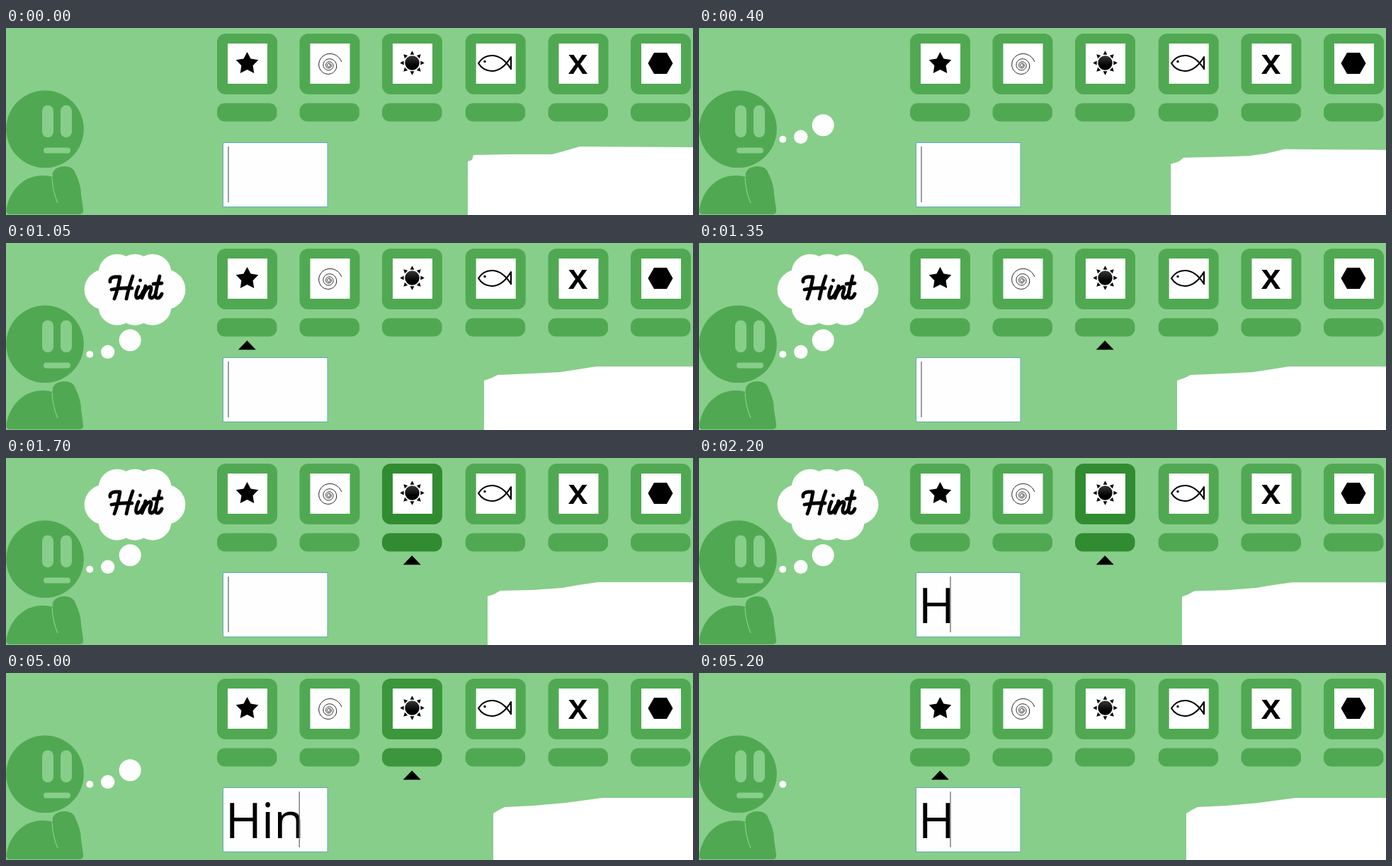
These frames come from a looping animation (970x265 px, 5300 ms). An HTML page:

```html
<!DOCTYPE html>
<html lang="en">
<head>
<meta charset="utf-8">
<title>Hint</title>
<style>
  html, body { margin: 0; width: 100%; height: 100%; overflow: hidden; background: #87ce8a; }
  svg { display: block; }
  .typed { font: 70px "Open Sans", "Noto Sans", sans-serif; letter-spacing: -0.5px; }
  .line { fill: none; stroke: #000; stroke-linecap: round; stroke-linejoin: round; }
</style>
</head>
<body>
<svg width="970" height="265" viewBox="0 0 970 265">
  <defs>
    <linearGradient id="sunFill" x1="0" y1="0" x2="0" y2="1">
      <stop offset="0" stop-color="#383838"/><stop offset=".7" stop-color="#000"/>
    </linearGradient>
  </defs>

  <g id="person" fill="#50a952">
    <circle cx="55" cy="143.3" r="54.8"/>
    <path d="M4 264Q-1 263 1 254C8 225 28 209 52 209Q60 209 66 211C64 202 72 196 83 196Q95 196 98 206Q106 222 106 236L109 257Q110 264 104 264Z"/>
    <path d="M65 212Q66 232 73 248" fill="none" stroke="#87ce8a" stroke-width="1.2"/>
    <g fill="#87ce8a">
      <rect x="51" y="109.500" width="16" height="45.500" rx="8"/>
      <rect x="77" y="109.500" width="16" height="45.500" rx="8"/>
      <rect x="53" y="169.500" width="38" height="8" rx="4"/>
    </g>
  </g>

  <g id="thought" fill="#fefefe">
    <circle cx="118.300" cy="157.800" r="5"/>
    <circle cx="143.700" cy="154.300" r="9.700"/>
    <circle cx="175.200" cy="137.800" r="15.500"/>
    <g>
      <g id="cloud"><rect x="139" y="42" width="86" height="48"/></g>
      <g class="line" stroke-width="4.800" role="img" aria-label="Hint">
        <path d="M147 55Q146 49 154 48H161Q158 66 153 79M179 47Q173 64 170 79M149 66Q165 63 178 64"/>
        <path d="M187 62Q181 76 185 78Q190 78 194 68M189.500 53h.1"/>
        <path d="M197 61L192 78Q197 64 203 62Q207 62 203 72Q202 79 206 78Q210 76 212 70"/>
        <path d="M217 47Q212 66 211 73Q211 79 215 78Q218 77 220 72M208 58L220 57"/>
      </g>
    </g>
  </g>

  <g id="cards"></g>

  <g id="icons">
    <path id="star"/>
    <path id="spiral" class="line" stroke-width=".9"/>
    <path id="rays"/>
    <circle cx="573.500" cy="49.500" r="10.200" fill="url(#sunFill)"/>
    <path class="line" stroke-width="2.200" d="M713 41Q701 61 686 61Q674 61 667 50Q674 39 686 39Q701 39 713 58Z"/>
    <circle cx="676" cy="47.500" r="1.700"/>
    <path d="M794.500 38h7l6 9 6-9h7l-9.500 13 10 14h-7l-6.500-10-6.500 10h-7l10-14z"/>
    <path d="M906.500 50L915 35H933L941.500 50L933 65H915Z"/>
  </g>

  <path id="arrow" d="M-12.500 151.300L0 138.300L12.500 151.300Z"/>

  <rect x="306.500" y="162.500" width="147.500" height="91" fill="#fefefe" stroke="#62a9b8"/>
  <text id="typed" class="typed" x="309.600" y="234"></text>
  <rect id="caret" y="168" width="1.400" height="79" fill="#777"/>

  <polygon id="sheet" fill="#fff"/>
</svg>
<script>
const LOOP = 5300;
const $ = id => document.getElementById(id);
const add = (parent, tag, attrs) => {
  const el = document.createElementNS("http://www.w3.org/2000/svg", tag);
  for (const k in attrs) el.setAttribute(k, attrs[k]);
  return parent.appendChild(el);
};
const polar = (cx, cy, r, a) => `${(cx + r * Math.cos(a)).toFixed(2)} ${(cy + r * Math.sin(a)).toFixed(2)}`;
const range = (n, f) => Array.from({ length: n }, (_, i) => f(i));
const mix = (a, b, k) => a.map((v, i) => v + (b[i] - v) * k);

// Cloud lobes
for (const x of [139, 225]) add($("cloud"), "circle", { cx: x, cy: 66, r: 28.4 });
for (const x of [157, 182, 207])
  for (const y of [42.3, 90]) add($("cloud"), "circle", { cx: x, cy: y, r: 26.5 });

// Cards with label pills
const cardX = [298, 414.5, 531, 648.7, 765.5, 882];
const cards = cardX.map(x => {
  const g = add($("cards"), "g", { fill: "#50a952" });
  add(g, "rect", { x, y: 8, width: 85, height: 86, rx: 12 });
  add(g, "rect", { x, y: 106.5, width: 84.5, height: 26, rx: 11 });
  add(g, "rect", { x: x + 15, y: 22, width: 56, height: 57, fill: "#fff" });
  return g;
});

// Icons built from angles
$("star").setAttribute("d", "M" + range(10, i =>
  polar(340.5, 50.5, i % 2 ? 8.5 : 16.6, i * Math.PI / 5 - Math.PI / 2)).join("L") + "Z");
$("spiral").setAttribute("d", "M" + range(260, i => {
  const a = 0.3 + i * 0.1;
  return polar(456, 53, 19 * Math.exp(-0.092 * a), -a);
}).join("L"));
$("rays").setAttribute("d", range(8, i => {
  const a = i * Math.PI / 4, p = (r, d) => polar(573.5, 49.5, r, a + d);
  return `M${p(17.3, 0)}L${p(12.2, 0.24)}L${p(12.2, -0.24)}Z`;
}).join(""));

// Top edge of the white sheet: [step, x, y, x, y, ...]
const edges = [
  [0, 652, 189, 658, 187, 660, 180, 712, 179, 771, 179, 786, 175, 810, 168, 970, 169],
  [4, 671, 194, 684, 190, 692, 185, 735, 184, 778, 182, 805, 179, 832, 173, 970, 174],
  [5, 675, 195, 686, 191, 694, 187, 742, 185, 782, 183, 808, 179, 833, 175, 970, 175],
  [8, 680, 196, 689, 193, 698, 188, 745, 187, 786, 184, 808, 180, 836, 176, 970, 176],
  [12, 688, 199, 696, 194, 704, 190, 745, 188, 790, 184, 812, 181, 842, 177, 970, 177]
];
function sheetEdge(step) {
  const i = Math.min(edges.findLastIndex(e => e[0] <= step), edges.length - 2);
  const [a, b] = [edges[i], edges[i + 1]];
  return mix(a, b, (step - a[0]) / (b[0] - a[0])).slice(1);
}

// Start times of each stepped action
const thinkAt = [100, 250, 400, 550];
const arrowAt = [1050, 1200, 1350];
const darkAt = [1500, 1600, 1700];
const typeAt = [2200, 2300, 2400, 2500];
const undoAt = [5000, 5100, 5200];
const sheetAt = [...thinkAt, 1050, ...darkAt, ...typeAt];
const caretX = [313.3, 354.3, 375.5, 413.5, 445];
const thoughts = [...$("thought").children];

function draw(t) {
  const done = times => times.filter(s => s <= t).length;
  const undo = done(undoAt);

  const shown = done(thinkAt) - undo;
  thoughts.forEach((el, i) => el.style.display = i < shown ? "" : "none");

  const spot = done(arrowAt) - Math.max(0, undo - 1);
  $("arrow").style.display = spot ? "" : "none";
  if (spot) $("arrow").setAttribute("transform", `translate(${224 + 116.4 * spot} 0)`);

  const shade = mix([80, 169, 82], [49, 140, 49], (done(darkAt) - undo) / 3);
  cards[2].setAttribute("fill", `rgb(${shade.map(Math.round)})`);

  const typed = done(typeAt) - undo;
  $("typed").textContent = "Hint".slice(0, Math.max(0, typed));
  $("caret").setAttribute("x", caretX[typed]);

  $("sheet").setAttribute("points", [...sheetEdge(done(sheetAt)), 970, 265, edges.length && sheetEdge(done(sheetAt))[0], 265].join(" "));
}

const start = performance.now();
function tick() {
  draw((performance.now() - start) % LOOP);
  requestAnimationFrame(tick);
}
tick();
</script>
</body>
</html>
```
